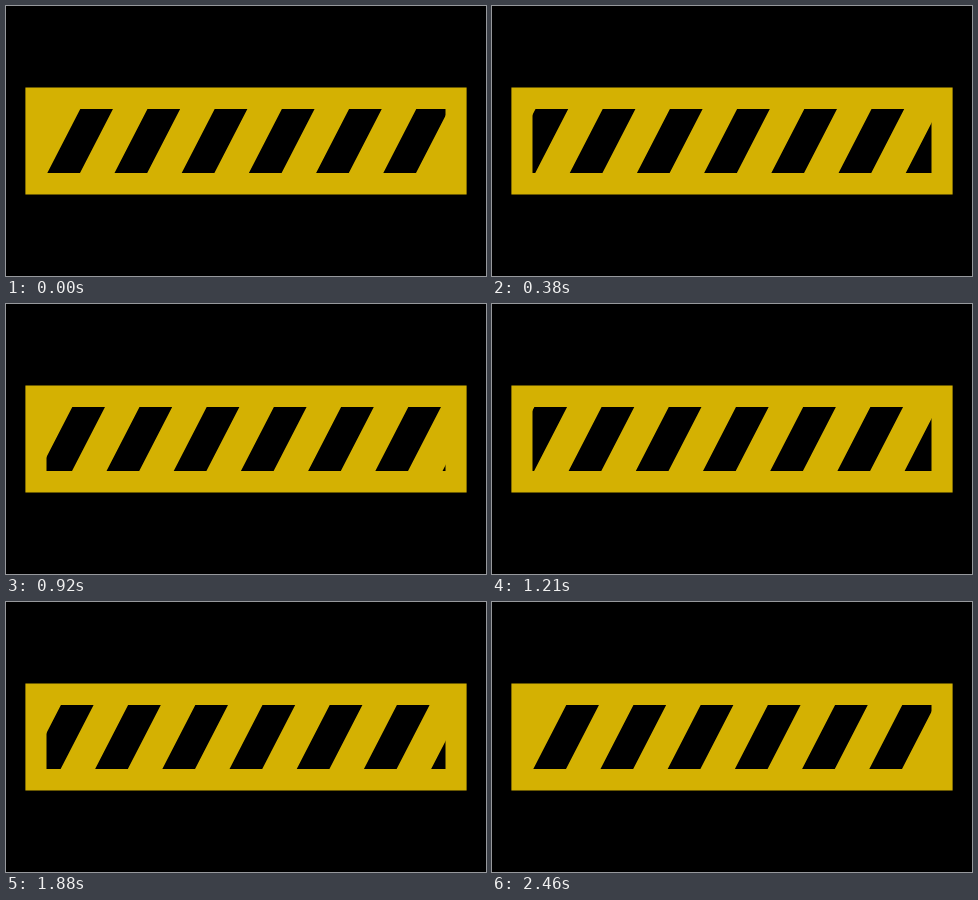
Animation of 480x270 px, one loop 2.5 s. Source, as an HTML page:

```html
<!DOCTYPE html>
<html lang="en">
<head>
<meta charset="utf-8">
<title>Hazard stripes</title>
<style>
  html, body {
    margin: 0;
    width: 100%;
    height: 100%;
    overflow: hidden;
    background: #000;
  }
  svg { display: block; }
  .plate { fill: #d4b102; }
  .stripes {
    fill: none;
    stroke: #000;
    stroke-width: 64;
    stroke-dasharray: 32.7 34.5;
    /* 24 steps per second; the last step completes three periods */
    animation: slide 2500ms steps(60) -4ms infinite;
  }
  @keyframes slide {
    from { stroke-dashoffset: 0; }
    to { stroke-dashoffset: calc(3 * 67.2px * 60 / 59); }
  }
</style>
</head>
<body>
<svg width="480" height="270" viewBox="0 0 480 270">
  <rect class="plate" x="19.4" y="81.5" width="441.2" height="107"/>
  <svg x="40.5" y="103" width="399" height="64" overflow="hidden">
    <path class="stripes" d="M-67.2 -32H470" transform="matrix(1 0 -.515 1 .8 64)"/>
  </svg>
</svg>
</body>
</html>
```
